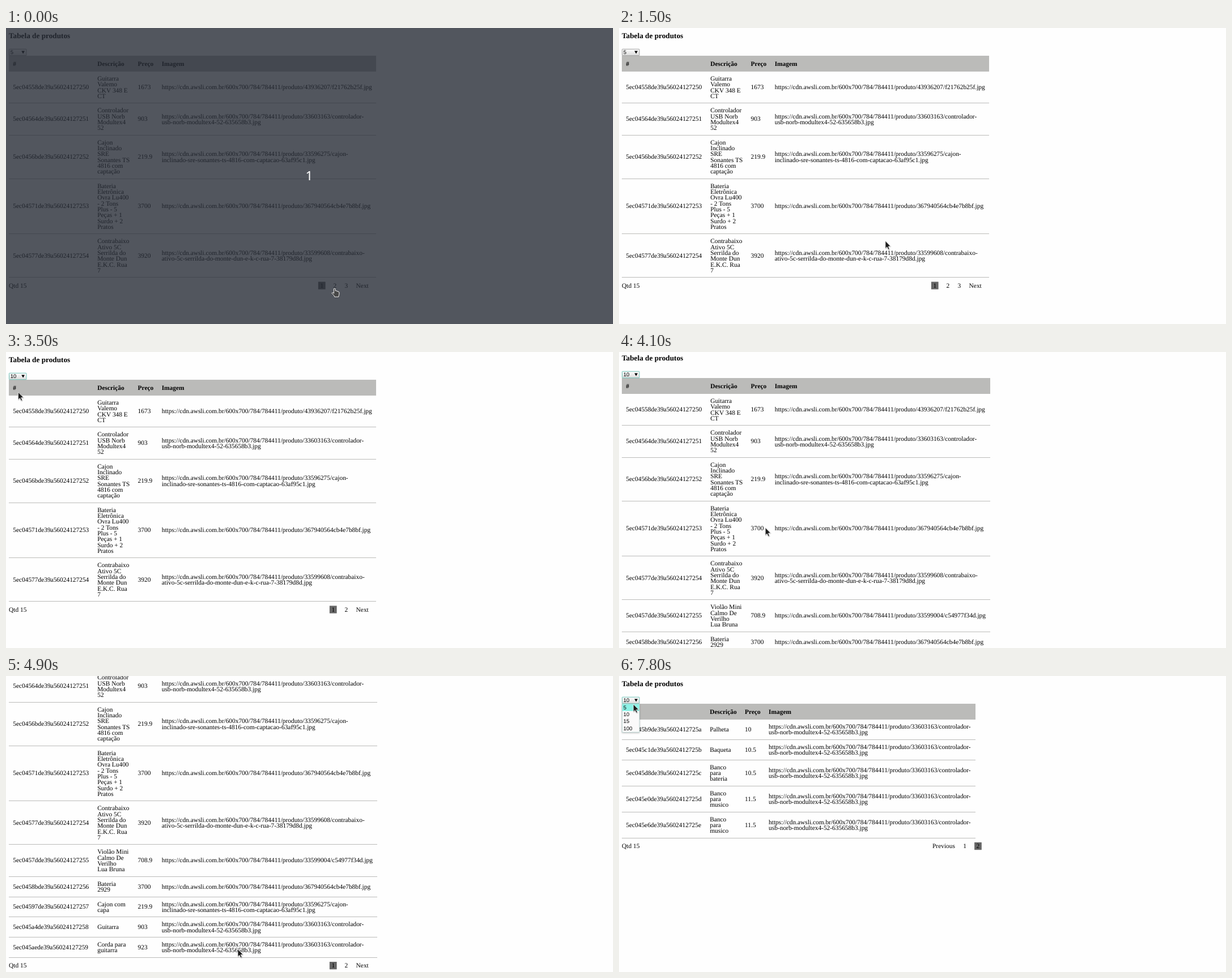
These frames come from a looping animation (1071 by 523 pixels, 8 s). An HTML page:

```html
<!DOCTYPE html>
<html lang="pt-BR">
<head>
<meta charset="utf-8">
<title>Tabela de produtos</title>
<style>
  html, body { margin: 0; width: 100%; height: 100%; overflow: hidden; background: #fefefe; }
  svg { display: block; width: 1071px; height: 523px; overflow: hidden; }
  text { font: 11.4px "Liberation Serif", "Times New Roman", serif; fill: #000; white-space: pre; text-rendering: geometricPrecision; }
  .bold { font-weight: bold; }
  .title { font-size: 13.25px; font-weight: bold; }
  .ui { font: 9.5px "Liberation Sans", Arial, sans-serif; }
  .count { font: 22.5px "Noto Sans", "Open Sans", sans-serif; fill: #fff; }
</style>
</head>
<body>
<svg id="stage" viewBox="0 0 1071 523">
  <defs>
    <linearGradient id="face" x1="0" y1="0" x2="0" y2="1">
      <stop offset="0" stop-color="#fcfcfc"/><stop offset="1" stop-color="#dcdcdc"/>
    </linearGradient>
    <filter id="drop" x="-30%" y="-30%" width="160%" height="160%">
      <feDropShadow dx="0" dy="1" stdDeviation="1.6" flood-opacity=".3"/>
    </filter>
    <filter id="soft" x="-40%" y="-40%" width="180%" height="180%">
      <feDropShadow dx=".5" dy=".8" stdDeviation=".7" flood-opacity=".35"/>
    </filter>
  </defs>
  <rect width="1071" height="523" fill="#fefefe"/>
  <g id="page"></g>
  <g id="popup"></g>
  <g id="dim">
    <rect width="1071" height="523" fill="rgb(39,44,54)" fill-opacity=".8"/>
    <text class="count" x="535" y="269" text-anchor="middle">1</text>
  </g>
  <g id="cursor" filter="url(#soft)">
    <path id="arrow" d="M0 0V13.2L3 10.5L5 15.2L7.2 14.2L5.2 9.7L9.2 9.3Z" fill="#1c1c1c" stroke="#fff" stroke-width=".7"/>
    <path id="hand" d="M-1.6 1.4Q-.3 -.4 1 1.4L1.2 5L3.7 5.2L4 6L6.2 6L6.4 6.8Q8 6.8 8 8.5L7.7 12L6.7 15.8H-.1L-1.6 13L-5.2 9.3Q-4.8 7.6 -2.8 8.5L-1.5 9.6Z" fill="#474747" stroke="#fff" stroke-width=".9"/>
    <path id="beam" d="M0 .5H1.8L2.5 1.2L3.2 .5H5M2.5 1.2V14.8M0 15.5H1.8L2.5 14.8L3.2 15.5H5" fill="none" stroke="#222"/>
  </g>
</svg>
<script>
const $ = id => document.getElementById(id);
const LINE = 10.3, PAD = 7.1, TOP = 77, LOOP = 8000, STEP = 100;

function el(parent, name, attrs, text) {
  const node = document.createElementNS('http://www.w3.org/2000/svg', name);
  for (const key in attrs) node.setAttribute(key, attrs[key]);
  if (text !== undefined) node.textContent = text;
  return parent.appendChild(node);
}
const show = (node, on) => { node.style.display = on ? '' : 'none'; };

const CONTROLLER = '33603163/controlador-|usb-norb-modultex4-52-635658b3.jpg';
const CAJON = '33596275/cajon-|inclinado-sre-sonantes-ts-4816-com-captacao-63af95c1.jpg';
const DRUMS = '367940564cb4e7b8bf.jpg';

// id, description lines, price, image
const firstRows = [
  ['5ec04558de39a56024127250', 'Guitarra|Valemo|CKV 348 E|CT', '1673', '43936207/f21762b25f.jpg'],
  ['5ec04564de39a56024127251', 'Controlador|USB Norb|Modultex4|52', '903', CONTROLLER],
  ['5ec0456bde39a56024127252', 'Cajon|Inclinado|SRE|Sonantes TS|4816 com|captação', '219.9', CAJON],
  ['5ec04571de39a56024127253', 'Bateria|Eletrônica|Ovra Lu400|- 2 Tons|Plus - 5|Peças + 1|Surdo + 2|Pratos', '3700', DRUMS],
  ['5ec04577de39a56024127254', 'Contrabaixo|Ativo 5C|Serrilda do|Monte Dun|E.K.C. Rua|7', '3920',
    '33599608/contrabaixo-|ativo-5c-serrilda-do-monte-dun-e-k-c-rua-7-38179d8d.jpg']
];
const moreRows = [
  ['5ec0457dde39a56024127255', 'Violão Mini|Calmo De|Verilho|Lua Bruna', '708.9', '33599004/c54977f34d.jpg'],
  ['5ec0458bde39a56024127256', 'Bateria|2929', '3700', DRUMS],
  ['5ec04597de39a56024127257', 'Cajon com|capa', '219.9', CAJON],
  ['5ec045a4de39a56024127258', 'Guitarra', '903', CONTROLLER],
  ['5ec045aede39a56024127259', 'Corda para|guitarra', '923', CONTROLLER]
];
const lastRows = [
  ['5ec045b9de39a5602412725a', 'Palheta', '10', CONTROLLER],
  ['5ec045c1de39a5602412725b', 'Baqueta', '10.5', CONTROLLER],
  ['5ec045d8de39a5602412725c', 'Banco|para|bateria', '10.5', CONTROLLER],
  ['5ec045e0de39a5602412725d', 'Banco|para|musico', '11.5', CONTROLLER],
  ['5ec045e6de39a5602412725e', 'Banco|para|musico', '11.5', CONTROLLER]
];

const page = $('page');
el(page, 'text', { x: 5, y: 18, class: 'title' }, 'Tabela de produtos');

function makeTable(rows, right, cols) {
  const g = el(page, 'g', {});
  el(g, 'rect', { x: 5, y: 49, width: right - 5, height: 28, fill: '#bbbbb9' });
  ['#', 'Descrição', 'Preço', 'Imagem'].forEach((name, i) =>
    el(g, 'text', { x: cols[i], y: 67, class: 'bold' }, name));
  let top = TOP;
  for (const [id, desc, price, image] of rows) {
    const url = 'https://cdn.awsli.com.br/600x700/784/784411/produto/' + image;
    const cells = [id, desc, price, url].map(s => s.split('|'));
    const tall = Math.max(...cells.map(c => c.length));
    cells.forEach((lines, c) => {
      // Baselines sit on whole pixels; single lines centre slightly higher.
      const base = top + PAD + (tall - lines.length) / 2 * LINE + (lines.length > 1 ? 8.8 : 8.5);
      lines.forEach((s, i) => el(g, 'text', { x: cols[c], y: Math.round(base + i * LINE) }, s));
    });
    top += tall * LINE + 2 * PAD + 1;
    el(g, 'rect', { x: 5, y: Math.round(top - 1.05), width: right - 5, height: 1, fill: '#bbbbb9' });
  }
  return { g, bottom: top };
}
const wide = [12.2, 161.2, 232.6, 274.7];
const tables = [
  makeTable(firstRows, 653, wide),
  makeTable(firstRows.concat(moreRows), 655, wide),
  makeTable(lastRows, 629, [12.2, 160.2, 222.1, 264.1])
];

// Pagers hang below the table; "*" marks the current page.
function makePager(items) {
  const g = el(page, 'g', {});
  el(g, 'text', { x: 5, y: 17.3 }, 'Qtd 15');
  for (const [x, label] of items) {
    const current = label[0] === '*';
    if (current) el(g, 'rect', { x: x - 3.5, y: 7, width: 12.7, height: 13.3, fill: '#666' });
    el(g, 'text', { x, y: 17.3 }, current ? label.slice(1) : label);
  }
  return g;
}
const pagers = [
  makePager([[554.4, '*1'], [577.6, '2'], [597.6, '3'], [617.6, 'Next']]),
  makePager([[574.4, '*1'], [597.6, '2'], [617.6, 'Next']]),
  makePager([[553, 'Previous'], [607.2, '1'], [630.6, '*2']])
];

const box = el(page, 'rect', { x: 5.5, y: 37.3, width: 30.5, height: 11.4, rx: .8, fill: 'url(#face)' });
const value = el(page, 'text', { x: 7.8, y: 46, class: 'ui' }, '5');
el(page, 'path', { d: 'M27.3 40.6H33L30.15 45.4Z', fill: '#000' });

const popup = $('popup');
el(popup, 'rect', { x: 5.4, y: 49.4, width: 30.6, height: 49.8, fill: '#fafafa', stroke: '#a9c9c5', 'stroke-width': .7, filter: 'url(#drop)' });
const mark = el(popup, 'rect', { x: 5.7, width: 30, height: 12.2, fill: '#8cf2e6' });
['5', '10', '15', '100'].forEach((s, i) =>
  el(popup, 'text', { x: 7.8, y: 58.9 + i * 12.2, class: 'ui' }, s));

// Pointer poses: time, x, y, shape
const poses = [];
const pose = (t, x, y, shape = 'arrow') => poses.push({ t, x, y, shape });
const ease = p => p * p * (3 - 2 * p);
function glide(t, steps, x0, y0, x1, y1) {
  for (let k = 1; k <= steps; k++) {
    const p = ease(k / steps);
    pose(t + (k - 1) * STEP, x0 + (x1 - x0) * p, y0 + (y1 - y0) * p);
  }
}
pose(0, 580, 459.3, 'hand');
pose(1000, 580, 458.5, 'hand');
glide(1400, 7, 580, 459, 25, 42);
glide(2300, 3, 25, 42, 24, 54.5);
glide(2700, 3, 24, 54.5, 21.5, 71);
glide(3900, 3, 21.5, 71, 258.2, 310.5);
pose(4200, 259.2, 313);
pose(4900, 409, 482.7);
pose(5000, 0, 0, 'none');
pose(5200, 554, 512);
pose(5300, 576, 507);
pose(5400, 593, 505, 'hand');
pose(5500, 598.5, 505, 'hand');
pose(5800, 598.3, 505);
pose(6200, 597.5, 505);
pose(6500, 622, 489);
pose(6600, 491, 212, 'beam');
glide(6800, 7, 491, 212, 23, 44);
pose(7600, 24, 72);
pose(7700, 25, 61);
pose(7800, 25.3, 50);

const shapes = ['arrow', 'hand', 'beam'];

function render(ms) {
  const t = Math.floor(ms / STEP) * STEP;
  const open = (t >= 2300 && t < 3100) || t >= 7400;
  const focus = (t >= 2300 && t < 5800) || t >= 7400;
  const tab = t < 3600 ? 0 : t < 6000 ? 1 : 2;
  const pager = t < 3500 ? 0 : t < 5800 ? 1 : 2;
  const scroll = t < 4100 || t >= 6000 ? 0 : Math.round(143 * ease(Math.min(1, (t - 4063) / 437)));

  page.setAttribute('transform', `translate(0 ${-scroll})`);
  tables.forEach((x, i) => show(x.g, i === tab));
  pagers.forEach((g, i) => {
    show(g, i === pager);
    g.setAttribute('transform', `translate(0 ${tables[tab].bottom})`);
  });
  value.textContent = t < 3100 ? '5' : '10';
  box.setAttribute('stroke', focus ? '#72c4b9' : '#a0a0a0');

  const now = poses.filter(p => p.t <= t).pop();
  shapes.forEach(s => show($(s), s === now.shape));
  $('cursor').setAttribute('transform', `translate(${now.x} ${now.y})`);

  show(popup, open);
  const start = t < 5000 ? 0 : 1;
  const row = now.y < 49 ? start : Math.min(3, Math.floor((now.y - 49.4) / 12.2));
  mark.setAttribute('y', 49.7 + row * 12.2);
  show($('dim'), t < 100);
}

const begin = performance.now();
function tick() {
  render((performance.now() - begin) % LOOP);
  requestAnimationFrame(tick);
}
tick();
</script>
</body>
</html>
```
